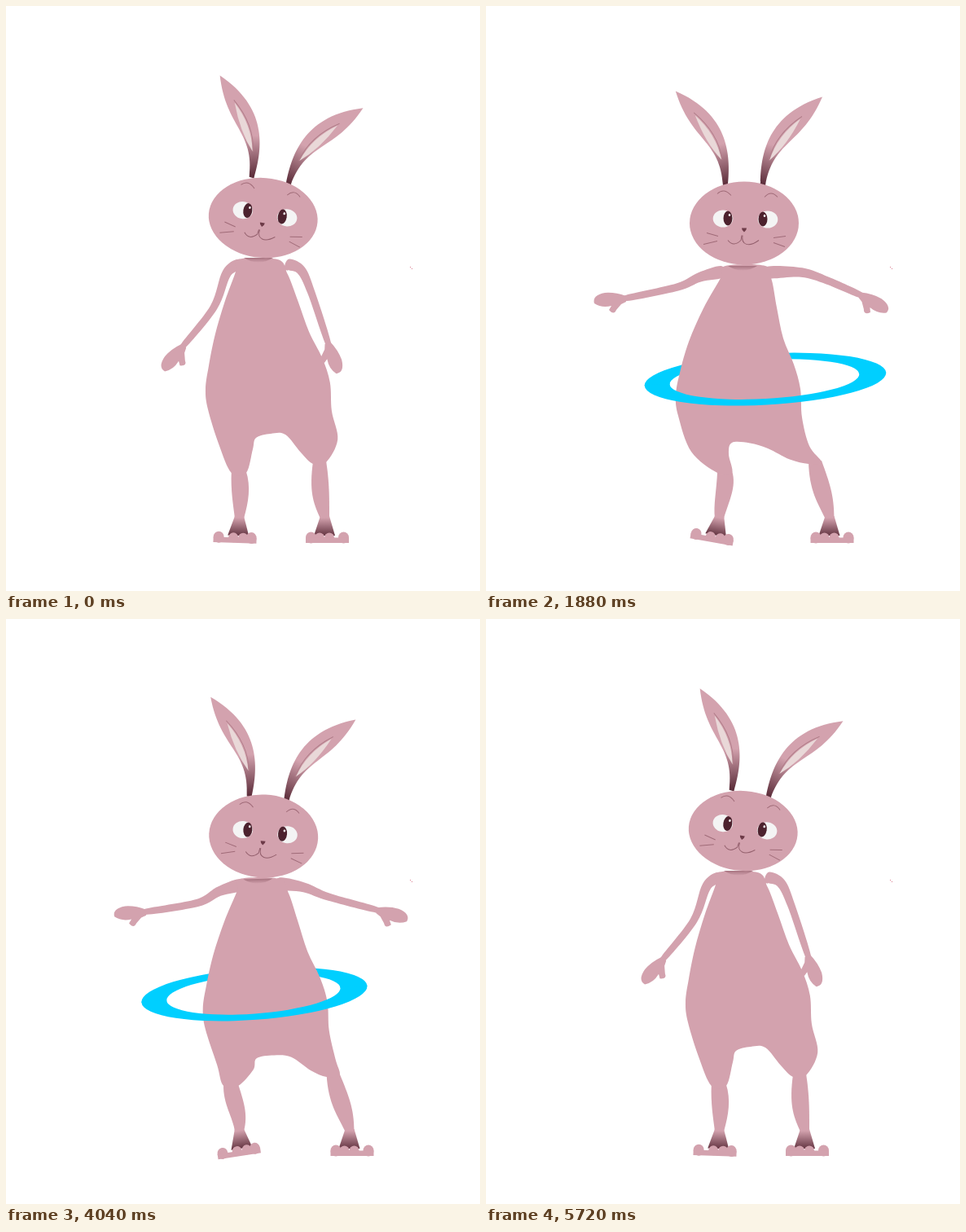
These frames come from a looping animation (582x718 px, 5760 ms). An HTML page with a canvas:

```html
<!DOCTYPE html>
<html lang="en">
<head>
<meta charset="utf-8">
<title>Hoop bunny</title>
<style>
html, body { margin: 0; width: 100%; height: 100%; overflow: hidden; background: #fff; }
canvas { display: block; }
</style>
</head>
<body>
<canvas id="stage" width="582" height="718"></canvas>
<script>
const g = document.getElementById('stage').getContext('2d');
const LOOP = 5760, STEP = 40, CYCLE = 680;
const PINK = '#d3a2ae', DARK = '#5f303d', LINE = '#a06b78', BLUE = '#00cfff';

const mix = (a, b, k) => a + (b - a) * k;
const mixAll = (a, b, k) => a.map((v, i) => mix(v, b[i], k));
const clamp = v => Math.max(0, Math.min(1, v));
const ease = (t, from, to) => { const k = clamp((t - from) / (to - from)); return k * k * (3 - 2 * k); };
// 1 before and after, 0 in between
const outside = (t, a, b, c, d) => 1 - ease(t, a, b) + ease(t, c, d);
const phase = t => (t + 200) % CYCLE / CYCLE;

// Closed spline through a flat x,y list
function blob(p) {
  const n = p.length / 2, at = i => [p[(i + n) % n * 2], p[(i + n) % n * 2 + 1]];
  g.beginPath();
  g.moveTo(p[0], p[1]);
  for (let i = 0; i < n; i++) {
    const [a, b, c, d] = [at(i - 1), at(i), at(i + 1), at(i + 2)];
    g.bezierCurveTo(b[0] + (c[0] - a[0]) / 6, b[1] + (c[1] - a[1]) / 6,
      c[0] - (d[0] - b[0]) / 6, c[1] - (d[1] - b[1]) / 6, c[0], c[1]);
  }
  g.fillStyle = PINK;
  g.fill();
}

function shape(d, fill = PINK) {
  g.fillStyle = fill;
  g.fill(new Path2D(d));
}

function line(d, color = LINE, width = 1) {
  g.strokeStyle = color;
  g.lineWidth = width;
  g.stroke(new Path2D(d));
}

function oval(x, y, rx, ry, fill = PINK) {
  g.beginPath();
  g.ellipse(x, y, rx, ry, 0, 0, 7);
  g.fillStyle = fill;
  g.fill();
}

function fade(x0, y0, x1, y1, a = PINK, b = DARK) {
  const f = g.createLinearGradient(x0, y0, x1, y1);
  f.addColorStop(0, a);
  f.addColorStop(1, b);
  return f;
}

function turned(x, y, deg, draw) {
  g.save();
  g.translate(x, y);
  g.rotate(deg * Math.PI / 180);
  draw();
  g.restore();
}

// 0 = hips fully left, 1 = fully right
function sway(t) {
  t = Math.min(t, 4960);
  const u = phase(t), reach = t < 4560 ? .8 : 1;
  return reach * (ease(u, .055, .415) - ease(u, .6, .96));
}

// Shoulder, upper arm, elbow, wrist, then hand angle
const ARM_L = {
  left: [291,326, 262,333, 235,345, 170,359, 180],
  right: [277,326, 258,342, 234,367, 171,363, 183],
  stand: [288,317, 271,328, 255,370, 217,418, 135]
};
const ARM_R = {
  left: [345,327, 388,327, 420,337, 461,355, 26],
  right: [328,323, 354,331, 384,344, 455,359, 4],
  stand: [345,317, 362,324, 375,352, 396,415, 66]
};

function arm(set, k, w, flip) {
  const p = mixAll(mixAll(set.left, set.right, k), set.stand, w), a = [], b = [];
  for (let i = 0; i < 4; i++) {
    const j = Math.max(0, i - 1) * 2, n = Math.min(3, i + 1) * 2;
    const dx = p[n] - p[j], dy = p[n + 1] - p[j + 1], s = (7 - 1.2 * i) / Math.hypot(dx, dy);
    a.push(p[i * 2] - dy * s, p[i * 2 + 1] + dx * s);
    b.unshift(p[i * 2] + dy * s, p[i * 2 + 1] - dx * s);
  }
  blob([...a, ...b]);
  turned(p[6], p[7], p[8], () => {
    g.scale(1, flip);
    shape('M-2-3Q12-8 24-7 40-4 37 6 28 12 16 9L19 14Q13 21 10 14L4 7-2 4Z');
  });
}

// Left side downwards and right side upwards, hips at the left
const SIDE_L = [[294,319], [288,334], [267,371], [249,412], [238,450], [233,478], [236,503], [252,547]];
const SIDE_R = [[397,540], [388,505], [386,470], [378,440], [365,408], [357,370], [351,337], [343,319]];
const CROTCH = { left: [302,536, 346,543], right: [316,544, 357,530], stand: [307,530, 343,526] };

function torso(beat, w, kneeL, kneeR) {
  const k = mix(beat, .55, w);
  const lean = ([x, y]) => [x + k * (22 - 39 * ((y - 490) / 170) ** 2), y - 8 * w];
  const [x1, y1, x2, y2] = mixAll(mixAll(CROTCH.left, CROTCH.right, beat), CROTCH.stand, w);
  blob([SIDE_L.map(lean), [kneeL - 11, 573], [kneeL + 7, 573], [x1 - 4, y1 + 14], [x1, y1],
    [(x1 + x2) / 2, (y1 + y2) / 2 - 3], [x2, y2], [(x2 + kneeR) / 2 - 2, (y2 + 562) / 2 + 4],
    [kneeR - 8, 562], [kneeR + 8, 560], SIDE_R.map(lean)].flat(2));
}

function legs(k, n, a) {
  const m = (n + a) / 2;
  shape(`M${k - 11} 571C${k - 12} 595 279 612 281 629H292C298 608 ${k + 13} 590 ${k + 7} 571Z`);
  shape(`M${n - 8} 559C${m - 16} 595 ${a - 14} 610 ${a - 5} 629H${a + 6}
    C${a + 6} 600 ${m + 9} 585 ${n + 8} 558Z`);
}

function foot(x, deg, shift) {
  turned(x, 628, deg, () => {
    shape('M-5-2H6L13 22H-13Z', fade(0, 0, 0, 23));
    for (const s of [-1, 1]) {
      oval(shift + s * 20, 24.5, 6.5, 7);
      oval(s * 6, 24.5, 6, 6);
    }
    g.fillRect(shift - 26.5, 24.5, 53, 6.5);
  });
}

function ear(side) {
  turned(side * 23, -46, side < 0 ? 6 : 0, () => {
    g.scale(side, 1);
    shape('M-3 0C-3-40 6-88 73-109C48-50 12-55 3 0Z', fade(18, -48, 2, -2));
    shape('M46-82Q18-62 8-31Q30-50 46-82Z', '#e9d8d8');
    line('M48-85Q16-64 7-31', '#b27e8a');
  });
}

function face(closed) {
  line('M-33-36Q-25-44-16-34M25-32Q33-41 41-32');
  line('M-46 12L-32 16M-50 26L-33 22M36 18L51 16M36 24L50 29');
  line('M-20 21Q-13 30-4 21L-3 15M-2 15C-4 27 6 30 18 21', '#94606d');
  shape('M-3 6H3Q3 9 0 11Q-3 9-3 6Z', '#6d3b48');
  if (closed) return line('M-38-7.5L-12-7M21-8L44-4', '#3a1a24', 1.4);
  for (const [x, pupil, y] of [[-26, -20, -6], [29, 23, -5]]) {
    oval(x, y + .5, 12.3, 10.5, '#f4f4f4');
    oval(pupil, y, 5.5, 9, '#4c222e');
    oval(pupil + 2, y - 4, 1.3, 1.5, '#fff');
  }
}

function head(p, w, closed) {
  const x = 317 - 2 * p, y = mix(266.5, 260, w);
  turned(x, y, 16.5 * p, () => { ear(-1); ear(1); });
  turned(x, y, 7 * p, () => oval(0, 0, 67, mix(51, 49, w)));
  turned(x, y, 13.5 * p, () => face(closed));
}

function hoop(t, beat, front) {
  if (t < 80) return;
  const calm = outside(t, 560, 1160, 4560, 4900), drop = ease(t, 4640, 5340);
  const wobble = Math.cos(4 * Math.PI * (phase(t) - .12));
  const x = mix(343 - 95 * beat, 322, calm);
  const spinY = 468 - 18 * ease(t, 1280, 2400) + 26 * beat * (1 - calm);
  const y = mix(mix(-50, spinY, ease(t, 80, 600)), 638, drop) + 10 * calm * (t > 4560) * (1 - drop);
  const rx = mix(137 + 16 * wobble, 156, calm), ry = mix(31.5, 20.5, calm);
  g.globalAlpha = 1 - ease(t, 5440, 5680);
  turned(x, y, (1.8 * wobble - 4.4) * (1 - drop), () => {
    g.beginPath();
    g.rect(-250, front ? -1 : -100, 500, 100);
    g.clip();
    g.beginPath();
    g.ellipse(0, 0, rx, ry, 0, 0, 2 * Math.PI);
    g.ellipse(-1, 0, rx - 32, ry - 7.5, 0, 0, 2 * Math.PI);
    g.fillStyle = BLUE;
    g.fill('evenodd');
  });
  g.globalAlpha = 1;
}

function draw(t) {
  g.clearRect(0, 0, 582, 718);
  const w = outside(t, 40, 500, 5220, 5640), beat = sway(t);
  const step = ease(t, 1200, 1800) - ease(t, 4560, 4900);
  const tilt = 2 + 11 * step * Math.cos(4 * Math.PI * phase(t));
  const kneeL = 286 + tilt * .9, kneeR = mix(404 - 6 * beat, 385, w);
  const ankleR = 391 + 30.5 * ease(t, 160, 520) - 17.5 * ease(t, 4560, 4960) - 13 * ease(t, 4960, 5400);

  hoop(t, beat, false);
  arm(ARM_L, beat ** 2, w, -1);
  arm(ARM_R, Math.sqrt(beat), w, 1);
  legs(kneeL, kneeR, ankleR);
  torso(beat, w, kneeL, kneeR);
  foot(286, tilt, -4);
  foot(ankleR, 0, 3.5);
  turned(mix(315 - 14 * beat, 310, w), mix(319, 309, w), -3 * beat * (1 - w), () =>
    shape('M-18 0H18Q0 11-18 0', fade(0, -1, 0, 6, '#a06c79', PINK)));

  const closed = (t >= 1160 && t < 1400) || (t >= 4840 && t < 5080);
  head(mix(beat, .64, w), w, closed);
  hoop(t, beat, true);

  g.fillStyle = '#d9788c';
  g.fillRect(496, 320, 1, 1);
  g.fillRect(498, 322, 1, 1);
}

const start = performance.now();
function tick() {
  const t = (performance.now() - start) % LOOP;
  draw(Math.floor(t / STEP) * STEP);
  requestAnimationFrame(tick);
}
tick();
</script>
</body>
</html>
```
